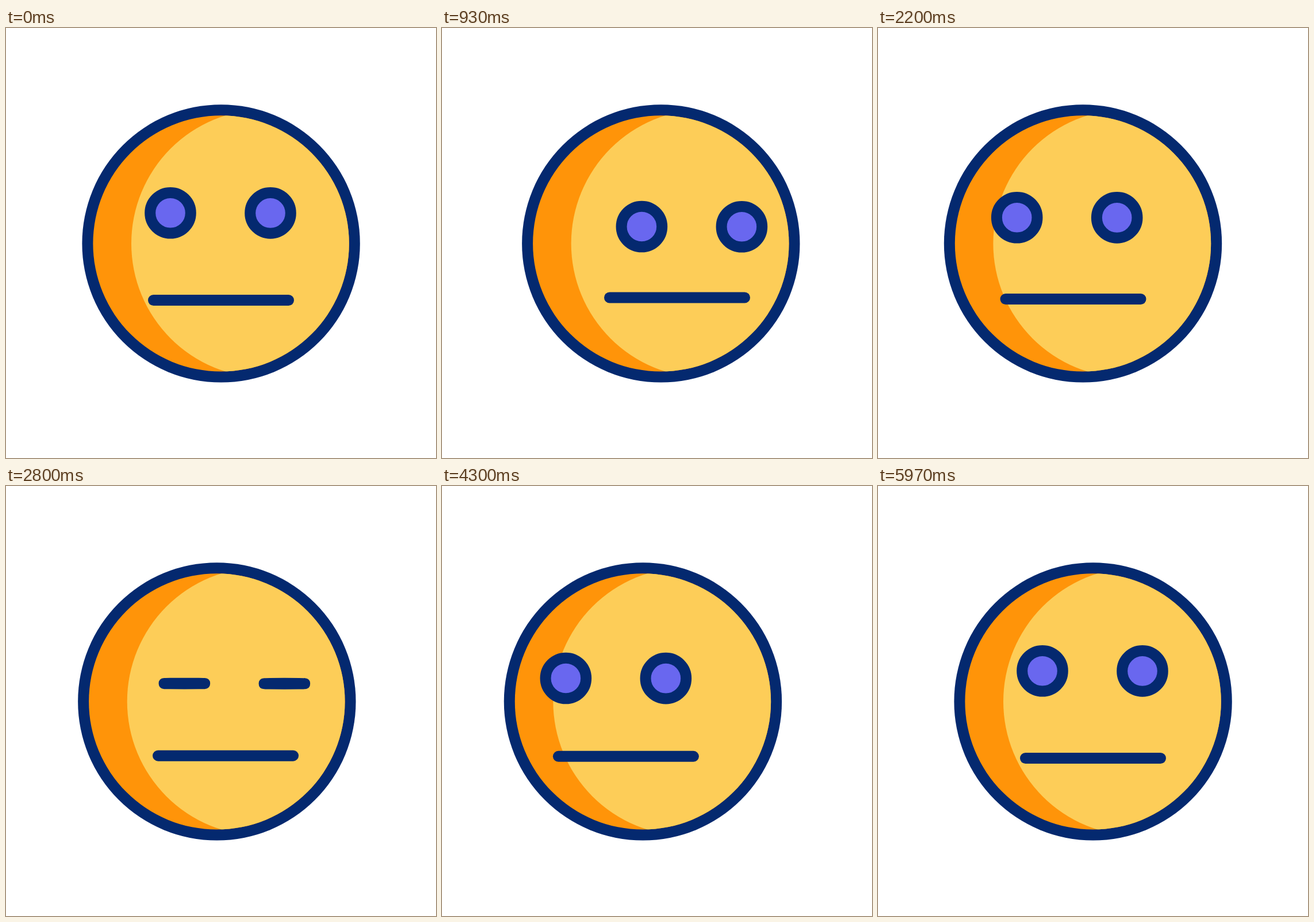
An HTML page with a canvas that plays this animation: 748x748 px, repeating every 6 s.

```html
<!DOCTYPE html>
<html lang="en">
<head>
<meta charset="utf-8">
<title>Neutral face</title>
<style>
  html, body { margin: 0; width: 100%; height: 100%; overflow: hidden; background: #fff; }
  canvas { display: block; width: 748px; height: 748px; }
</style>
</head>
<body>
<canvas id="stage" width="748" height="748"></canvas>
<script>
const ctx = document.getElementById('stage').getContext('2d');
const NAVY = '#04296f', ORANGE = '#ff9409', YELLOW = '#fdcd58', VIOLET = '#6967ef';
const LOOP = 6000, CYCLE = 50, LINE = 19;

// Look left, hold, look right, hold, return to the middle.
const KEYS = [0, 10, 14, 23, 28, 37];

const linear = x => x;
const smooth = x => x * x * (3 - 2 * x);
const smoother = x => x * x * x * (x * (6 * x - 15) + 10);
const glide = x => smooth(x) * 0.75 + smoother(x) * 0.25;

function travel(f, left, right, ease) {
  const values = [0, left, left, right, right, 0];
  for (let i = 1; i < KEYS.length; i++) {
    if (f < KEYS[i]) {
      const x = (f - KEYS[i - 1]) / (KEYS[i] - KEYS[i - 1]);
      return values[i - 1] + (values[i] - values[i - 1]) * ease(x);
    }
  }
  return 0;
}

// 25 drawings per second, shown on a 30 Hz clock.
function drawingAt(ms) {
  const tick = Math.floor((ms % LOOP) * 0.03 + 0.15);
  return Math.floor(tick * 5 / 6 + 1e-6) % CYCLE;
}

function disc(x, y, r, color) {
  ctx.beginPath();
  ctx.arc(x, y, r, 0, Math.PI * 2);
  ctx.fillStyle = color;
  ctx.fill();
}

function head(dx) {
  const x = 374.1 + dx, y = 374.9, r = 222.7;
  disc(x, y, r + LINE, NAVY);
  disc(x, y, r, ORANGE);
  ctx.save();
  ctx.beginPath();
  ctx.arc(x, y, r, 0, Math.PI * 2);
  ctx.clip();
  disc(x + 77.3, y, 233.4, YELLOW);
  ctx.restore();
}

function eye(x, y, open) {
  const r = 35.3;
  ctx.beginPath();
  ctx.ellipse(x, y, r, Math.max(r * open, 0.4), 0, 0, Math.PI * 2);
  ctx.fillStyle = VIOLET;
  ctx.fill();
  ctx.stroke();
}

function mouth(dx, dy) {
  ctx.beginPath();
  ctx.moveTo(256.5 + dx, 473.5 + dy);
  ctx.lineTo(491.5 + dx, 473.5 + dy);
  ctx.stroke();
}

function draw(f) {
  ctx.fillStyle = '#fff';
  ctx.fillRect(0, 0, 748, 748);
  ctx.strokeStyle = NAVY;
  ctx.lineWidth = LINE;
  ctx.lineCap = ctx.lineJoin = 'round';

  head(travel(f, -35.2, 6.7, linear));

  const ex = travel(f, -88.6, 61.4, glide);
  const ey = travel(f, 16, 23.8, glide);
  const open = smooth(Math.min(1, Math.abs(f - 20) / 3));
  eye(286 + ex, 321.7 + ey, open);
  eye(460 + ex, 321.9 + ey, open);

  mouth(travel(f, -69, 35, smooth), travel(f, -4, -4.5, smooth));
}

const start = performance.now();
function tick() {
  draw(drawingAt(performance.now() - start));
  requestAnimationFrame(tick);
}
tick();
</script>
</body>
</html>
```
